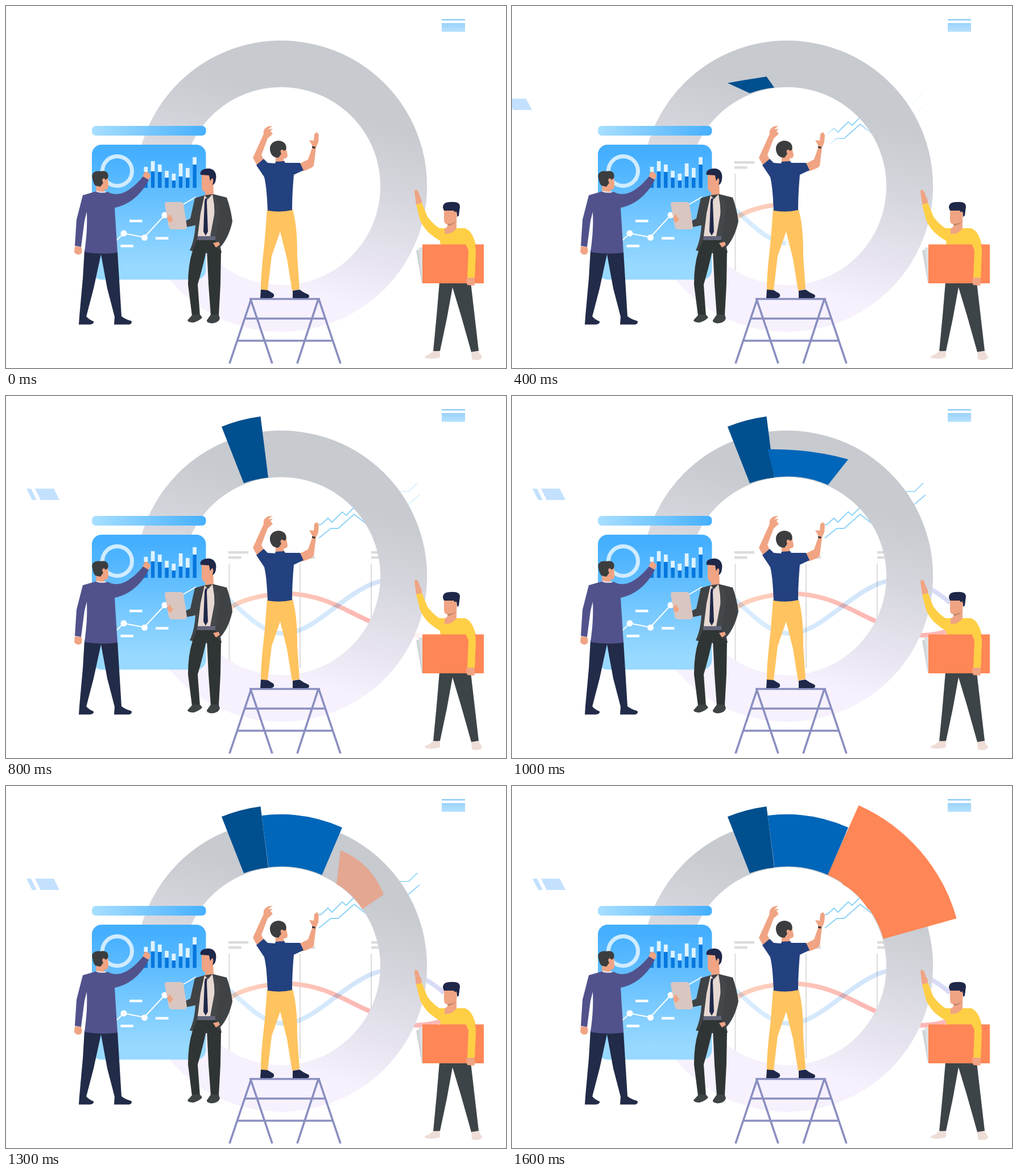
Write an HTML page that moves like this. It is 879 px wide and 637 px high and loops after 2.6 s.

```html
<!DOCTYPE html>
<html>
<head>
<meta charset="utf-8">
<style>
html, body { margin: 0; width: 100%; height: 100%; overflow: hidden; background: #fff; }
svg { display: block; }
.skin { fill: #f0a483; }
.navy { fill: #1f2849; }
.white { fill: #fff; }
.orange { fill: #ff8656; }
.line { fill: none; }
</style>
</head>
<body>
<svg width="879" height="637" viewBox="0 0 879 637">
<defs>
  <linearGradient id="ringFill" gradientUnits="userSpaceOnUse" x1="538" y1="124" x2="430" y2="510">
    <stop offset=".12" stop-color="#c7cacf"/><stop offset=".42" stop-color="#d6d7de"/>
    <stop offset=".7" stop-color="#e7e4ef"/><stop offset=".92" stop-color="#f6f1fd"/>
  </linearGradient>
  <linearGradient id="cardFill" x2="0" y2="1">
    <stop offset=".06" stop-color="#44afff"/><stop offset=".9" stop-color="#98d9ff"/>
  </linearGradient>
  <linearGradient id="barFill"><stop stop-color="#a8dfff"/><stop offset="1" stop-color="#45afff"/></linearGradient>
  <linearGradient id="tagFill" x2="0" y2="1"><stop stop-color="#9ad3fa"/><stop offset="1" stop-color="#b7e1fe"/></linearGradient>
  <linearGradient id="redFill" gradientUnits="userSpaceOnUse" x1="380" x2="640">
    <stop stop-color="#fdd3bd"/><stop offset="1" stop-color="#fcb7b4"/>
  </linearGradient>
  <linearGradient id="blueFill" gradientUnits="userSpaceOnUse" x1="390" x2="770">
    <stop stop-color="#d8edfe"/><stop offset=".6" stop-color="#d3e6fa"/><stop offset="1" stop-color="#d9daf5"/>
  </linearGradient>
  <linearGradient id="chartEdge" gradientUnits="userSpaceOnUse" x1="0" x2="30">
    <stop stop-color="#fff"/><stop offset="0" stop-color="#fff" stop-opacity=".3"/>
    <stop offset="1" stop-color="#fff" stop-opacity="0"/>
  </linearGradient>
  <radialGradient id="trendSpot" gradientUnits="userSpaceOnUse" cx="0" cy="0" r="1">
    <stop offset=".33" stop-color="#fff"/><stop offset="1" stop-color="#fff" stop-opacity="0"/>
  </radialGradient>
  <mask id="chartMask" maskUnits="userSpaceOnUse" x="0" y="0" width="879" height="637">
    <rect width="879" height="637" fill="url(#chartEdge)"/>
  </mask>
  <mask id="trendMask" maskUnits="userSpaceOnUse" x="0" y="0" width="879" height="637">
    <rect width="879" height="637" fill="url(#trendSpot)"/>
  </mask>
</defs>

<path fill="#8bcdf8" d="M766 23h41v2.500h-41z"/>
<path fill="url(#tagFill)" d="M766 30h41v15.500h-41z"/>
<path id="slashes" fill="#c3e1fe" d="M36 163h8l10 20h-8zM51 163h33l10 20h-33z"/>

<!-- line chart behind the ring -->
<g mask="url(#chartMask)">
  <path fill="#dcdcdc" d="M391 273h35v4.500h-35zM391 282h22.500v4.500h-22.500zM516 282h27v4.500h-27zM642 273h18v4.500h-18zM642 282h18v4.500h-18zM391.500 295h2v184h-2zM516 295h2v184h-2zM641 295h2v184h-2z"/>
  <g class="line" stroke-width="8">
    <path stroke="url(#redFill)" d="M376 388C400 360 450 347 500 348C560 350 600 380 641 397C670 410 700 421 722 421C740 421 755 417 775 411"/>
    <path stroke="url(#blueFill)" style="mix-blend-mode:multiply" d="M360 335C405 360 440 418 487 418C540 418 585 355 645 330C690 313 735 333 770 364"/>
  </g>
</g>
<g class="line" stroke="#8ed3f8" stroke-width="2">
  <g mask="url(#trendMask)">
    <path d="M550 226h4L566 215L573 222L591 204L598 210L613 195"/>
    <path d="M550 250L571 233H584L612 208L636 227"/>
  </g>
  <path id="trendEnd" stroke-width="1.700" d="M688 168H708L723 153M700 197L727 174"/>
</g>

<circle cx="484" cy="317" r="215.200" class="line" stroke="url(#ringFill)" stroke-width="82"/>
<path id="slice1" fill="#004f8f"/>
<path id="slice2" fill="#0066b9"/>
<path id="bud" class="orange" d="M588 113Q642 135 664 191L626 217Q609 188 581 173Z"/>
<path id="slice3" class="orange"/>

<!-- dashboard card -->
<rect x="151" y="211" width="200.500" height="17" rx="7" fill="url(#barFill)"/>
<rect x="151" y="244" width="200.500" height="237.500" rx="17" fill="url(#cardFill)"/>
<circle cx="195.500" cy="290.500" r="26" class="line" stroke="#d0ecff" stroke-width="7"/>
<g id="bars"></g>
<path class="line" stroke="#fff" stroke-width="2" d="M180 426L207 400L243 407L279 368L334 336"/>
<g class="white">
  <circle cx="207" cy="400" r="5.500"/><circle cx="243.500" cy="407.500" r="5.500"/><circle cx="279" cy="368" r="5.500"/>
  <path d="M217 376h22.500v4.500H217zM263 406.500h22.500v4.500H263zM201.500 420H224v4.500h-22.500zM318 382h17v4.500h-17z"/>
</g>

<!-- presenter in a purple coat -->
<g>
  <path class="skin" d="M159 312L166 298H179L180 317Q180 324 173 323L174 330H158ZM121 423L132 424Q135 431 132 436Q125 440 120 433ZM240 301L243 293Q249 289 254 298Q253 305 247 308Z"/>
  <path fill="#3c3d3e" d="M152 303C149 294 157 289 166 291C176 288 182 295 179 303L175 306Q173 302 170 304Q168 307 171 311L166 318L157 316Q153 311 152 303Z"/>
  <path fill="#222b48" d="M138 430L196 432L203 546L191 547L178 497L167 437L154 497L141 547L129 546L135 480ZM129 546H141Q146 552 154 555Q155 560 147 560.500H128ZM191 546H203Q211 552 220 554Q223 558 217 560.500H190Z"/>
  <path fill="#51528c" d="M159 326Q170 329 179 327C190 334 205 331 215 324C226 317 234 308 241 300L251 306C240 328 220 349 191 355L196 434Q168 438 138 433C142 405 143 385 142 362L138 378L132 424L121 422L124 376L135 333Z"/>
  <path class="line" stroke="#e7e5ee" stroke-width="2" d="M159 326Q168 329 176 327"/>
</g>

<!-- man in a suit -->
<g>
  <path class="skin" d="M344 297L357 296L364 302L365 333L355 342L350 334V327Q344 327 344 316Z"/>
  <path class="navy" d="M342 297C340 288 350 286 356 286C367 286 371 296 369 305Q368 313 363 315Q366 303 362 303L359 308L357 298Z"/>
  <path fill="#3f4346" d="M349 333L332 338L324 374L314 379L317 389L333 386C332 400 330 415 323 430L336 433Q360 437 379 434L377 424C386 415 394 398 398 379C396 362 392 348 388 337L364 331Z"/>
  <path fill="#e7d8d2" d="M349 333L355 340L363 331L366 350L368 405H337L342 365Z"/>
  <path class="navy" d="M350 339L354 338L353 345L355 397L351 404L347 397L349 345Z"/>
  <path fill="#44484b" d="M363 331L369 352L359 405L369 408L377 350Z"/>
  <path fill="#2f3534" d="M336 411H368L370 424L378 432L377 490L374 545H360L356 490L353 427Q346 460 337 490L341 545H327L320 490Q320 455 328 431Z"/>
  <path fill="#62657a" d="M337 405H368V412H336Z"/>
  <path fill="#3e4345" d="M328 543H341L345 548Q340 554 330 557Q320 557 319 553ZM360 543H374L376 550Q373 558 361 558.500Q352 557 353 553Z"/>
  <path class="skin" d="M364 417L374 415L376 420L369 425Z"/>
  <path fill="#dac6c0" d="M283 345H307Q311 345 312 349L318 388Q318 392 314 393H291Q287 392 286 388L279 349Q279 345 283 345Z"/>
  <path class="skin" d="M283 373L288 366L291 372L294 375L290 381Q285 381 283 373Z"/>
</g>

<!-- man on the ladder -->
<path class="line" stroke="#8a8fc0" stroke-width="3.700" d="M428 515.500H552M431 516L393 629M430 516L468 629M549 516L512 629M550 516L588 629M419 550H561M406 589H574"/>
<g>
  <path class="skin" d="M434 267L453 225C451 216 460 210 468 211L461 217L469 216L465 220L469 225L460 233L449 262L454 272L441 280ZM515 278L531 270L539 247L533 236L541 237L542 225L547 222L550 227L549 240L545 249L541 281Q538 286 521 291ZM474 262L479 247L492 248L495 262Q495 269 488 268L490 278H474Z"/>
  <path fill="#35363d" d="M538 246.500L544 248L543 251L538 249.500Z"/>
  <path fill="#3b3d3f" d="M464 253C463 243 471 237 479 237C488 237 495 244 492 253L489 255Q486 251 483 254Q482 257 484 260L479 267Q466 267 464 253Z"/>
  <path fill="#ffc35f" d="M459 358H504C511 385 512 410 512 440L516 498L503 501L494 445L482 397L467 440L460 500H448C448 470 452 440 455 410Z"/>
  <path fill="#23407f" d="M440 280L453 269L460 276L473 277L474 274L489 273L491 276L517 276L523 289L506 297C504 320 503 340 503 359Q482 364 460 360C459 338 458 318 454 301Z"/>
  <path class="navy" d="M448 499L460 500L470 506Q474 512 466 514H447ZM504 501L516 499Q524 505 532 508Q535 513 529 514H504Z"/>
</g>

<!-- man with a folder -->
<g>
  <path fill="#cdd3d7" d="M721 430L727 429L735 487H731Z"/>
  <path fill="#dce0e2" d="M725 425H735V487H732Z"/>
  <path fill="#3d4447" d="M762 486H817L831 607L818 609L800 545L785 495L775 550L763 607L751 608L757 545Z"/>
  <path fill="#eeddd7" d="M751 607L763 608V618Q750 623 736 619Q736 615 744 613ZM818 609L830 607L837 617Q837 623 826 623L819 622Z"/>
  <path fill="#fecf45" d="M721 349L731 346L741 371Q752 385 762 391H807C818 395 823 408 826 421H764L763 413C747 404 735 393 728 377Z"/>
  <path class="skin" d="M721 349L718 326Q720 320 725 327L728 336Q731 338 731 347ZM770 358L793 356L792 382V391Q785 402 771 401V392L776 388V384Q770 384 770 376Z"/>
  <path fill="#c58a70" d="M776 383Q786 384 791 378Q787 386 777 387Z"/>
  <path class="navy" d="M768 355Q768 345 780 345Q798 343 798 353L796 369L793 371Q793 358 789 363L787 360H770Z"/>
  <path class="orange" d="M732 419.500H840V488H732Z"/>
  <path fill="#fecf45" d="M806 391C818 395 826 418 826 432L824 479H811L813 430L806 414Z"/>
  <path class="skin" d="M810 478H823Q825 486 823 492L811 491Q808 485 810 478Z"/>
</g>
</svg>
<script>
const el = id => document.getElementById(id);
const HOLE = 175;

// top of each bar, and where its dark part begins
const bars = [[283, 292], [273, 291], [279, 292], [290, 302], [295, 307], [277, 300], [285, 302], [266, 279]];
el('bars').innerHTML = bars.map(([top, split], i) => {
  const x = 242.500 + i * 12.250;
  return `<path fill="#dff3ff" d="M${x} ${top}h6.700V320h-6.700z"/><path fill="#0577de" d="M${x} ${split}h6.700V320h-6.700z"/>`;
}).join('');

// Ring slice from two outer and two inner points; its outer edge rises as grow goes from 0 to 1.
function slice(id, radius, [x1, y1], [x2, y2], [x3, y3], [x4, y4], grow) {
  el(id).style.display = grow > 0 ? '' : 'none';
  const r = radius / Math.max(grow, .01);
  const left = y4 + (y1 - y4) * grow, right = y3 + (y2 - y3) * grow;
  el(id).setAttribute('d', `M${x1} ${left}A${r} ${r} 0 0 1 ${x2} ${right}` +
    `L${x3} ${y3}A${HOLE} ${HOLE} 0 0 0 ${x4} ${y4}Z`);
}

const place = (id, attr, value) => el(id).setAttribute(attr, value);
const clamp = v => Math.max(0, Math.min(1, v));

function draw(step) {
  place('slashes', 'transform', `translate(${Math.min(0, (step - 6) * 29.5)})`);
  const reveal = step < 8 ? Math.min(step, 6) : step - 1;
  place('chartEdge', 'gradientTransform', `translate(${328 + 76.5 * (reveal - 2)})`);
  place('trendSpot', 'gradientTransform', `translate(596 216) scale(${Math.max(.01, 50 * (step - 3))})`);
  el('trendEnd').style.opacity = step < 4 ? 0 : step < 8 ? .1 : clamp((step - 7) / 3);

  slice('slice1', 283, [379, 54], [447.5, 36], [461, 143.5], [418, 153.5], clamp(1 - .41 * (6 - step)));
  slice('slice2', 267, [449.5, 52], [591, 73], [555.5, 156.5], [461.5, 143], clamp(1 - .46 * (11 - step)));
  slice('slice3', 309, [609.5, 34], [781.5, 233], [653, 269], [555, 156.5], step < 16 ? 0 : 1);
  el('bud').style.opacity = step < 13 ? 0 : clamp(.5 + (step - 13) / 4);
}

function tick(now) {
  draw(Math.floor(now % 2600 / 100));
  requestAnimationFrame(tick);
}
draw(0);
requestAnimationFrame(tick);
</script>
</body>
</html>
```
